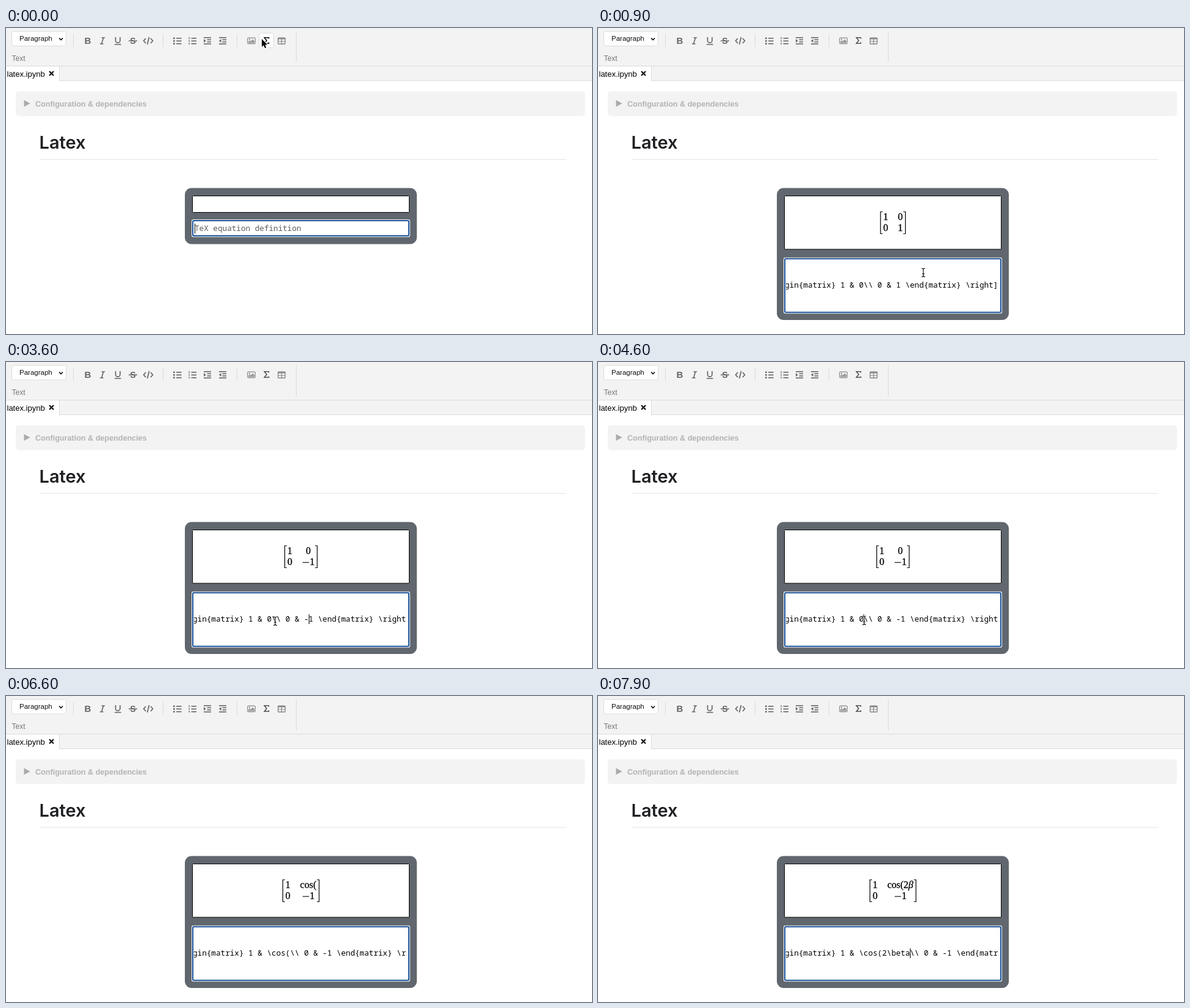
These frames come from a looping animation (960 px wide and 502 px high, 8000 ms). An HTML page with a canvas:

```html
<!DOCTYPE html>
<html lang="en">
<head>
<meta charset="utf-8">
<title>Equation editor</title>
<style>
html, body { margin: 0; width: 100%; height: 100%; overflow: hidden; background: #fff; }
canvas { display: block; width: 960px; height: 502px; }
</style>
</head>
<body>
<canvas id="stage" width="960" height="502"></canvas>
<script>
const ctx = document.getElementById('stage').getContext('2d');
const LOOP = 8000, PASTE = 400;
const SANS = '"Liberation Sans", Arial, sans-serif';
const SERIF = '"Liberation Serif", Times, serif';
const CODE = '12.67px "Noto Sans Mono", monospace';
const CHAR = 7.6, CODE_X = 306;

// Editing steps: time, upper right cell, lower right cell, caret index
const edits = [
  [PASTE, '0', '1', 46], [1900, '0', '1', 24], [2600, '0', '-1', 25],
  [4200, '0', '-1', 17], [4700, '', '-1', 16], [4900, '\\', '-1', 17],
  [5300, '\\c', '-1', 18], [5500, '\\co', '-1', 19], [5800, '\\cos', '-1', 20],
  [6100, '\\cos(', '-1', 21], [7000, '\\cos(2', '-1', 22],
  [7300, '\\cos(2\\', '-1', 23], [7400, '\\cos(2\\b', '-1', 24],
  [7600, '\\cos(2\\be', '-1', 25], [7700, '\\cos(2\\bet', '-1', 26],
  [7900, '\\cos(2\\beta', '-1', 27]
];

// Pointer path: time, x, y
const path = [
  [0, 419, 18], [100, 423, 24], [400, 500, 300], [800, 533, 401], [1100, 533, 402],
  [1800, 490, 422], [2900, 490, 422], [3500, 441, 425], [3800, 441, 425],
  [4100, 436, 424], [4700, 436, 424]
];
const clicks = [1900, 4100];

const within = (t, a, b) => t >= a && t < b;

function text(str, x, y, font, color) {
  ctx.font = font;
  ctx.fillStyle = color;
  ctx.fillText(str, x, y);
}

function box(x, y, w, h, r, fill, stroke, width = 1) {
  ctx.beginPath();
  ctx.roundRect(x, y, w, h, r);
  if (fill) { ctx.fillStyle = fill; ctx.fill(); }
  if (stroke) { ctx.strokeStyle = stroke; ctx.lineWidth = width; ctx.stroke(); }
}

function rect(x, y, w, h, color) {
  ctx.fillStyle = color;
  ctx.fillRect(x, y, w, h);
}

function stroke(d, color, width) {
  ctx.strokeStyle = color;
  ctx.lineWidth = width;
  ctx.stroke(new Path2D(d));
}

function polygon(d, fill, edge, width) {
  const shape = new Path2D(d);
  if (edge) {
    ctx.strokeStyle = edge;
    ctx.lineWidth = width;
    ctx.stroke(shape);
  }
  ctx.fillStyle = fill;
  ctx.fill(shape);
}

function listIcon(x, numbered) {
  for (let i = 0; i < 3; i++) {
    const y = 16 + i * 4.5;
    rect(x + 5, y, 8.5, 1.6, '#666');
    if (numbered) rect(x + 1, y - 1, 1.2, 3.2, '#666');
    else rect(x, y - 0.5, 2.6, 2.6, '#666');
  }
}

function indentIcon(x, outward) {
  rect(x, 15, 12, 1.6, '#666');
  rect(x, 25.4, 12, 1.6, '#666');
  rect(x + 5.5, 18.5, 6.5, 1.6, '#666');
  rect(x + 5.5, 22, 6.5, 1.6, '#666');
  polygon(outward ? `M${x + 3.5} 18V24L${x} 21Z` : `M${x} 18V24L${x + 3.5} 21Z`, '#666');
}

function toolbar(active) {
  rect(0, 0, 960, 86, '#f3f3f3');
  rect(0, 62, 960, 1, '#dcdcdc');
  box(9.5, 5.5, 89, 24, 3, '#fff', '#dcdcdc');
  text('Paragraph', 22, 21, '11.5px ' + SANS, '#111');
  stroke('M87 16.5L90 19.5L93 16.5', '#111', 1.7);
  for (const x of [110, 257, 378]) rect(x, 10, 1, 21, '#dadada');
  rect(475, 5, 1, 51, '#dadada');
  text('Text', 9.5, 54, '12px ' + SANS, '#777');

  text('B', 128.6, 26, 'bold 15px ' + SANS, '#666');
  stroke('M156.5 16H162M154 26H159.5M159.6 16L156.6 26', '#666', 1.6);
  stroke('M179.5 15V20.5A3.7 3.7 0 0 0 186.9 20.5V15M178 27H188.5', '#666', 1.7);
  text('S', 203.3, 26, 'bold 14px ' + SANS, '#666');
  rect(201, 20.4, 14, 1.5, '#666');
  stroke('M229 17L225.5 21L229 25M237 17L240.5 21L237 25M234.5 15L231.5 27', '#666', 1.7);
  listIcon(274, false);
  listIcon(298.5, true);
  indentIcon(324, false);
  indentIcon(349, true);

  box(395.7, 16.2, 12.6, 9.6, 1.5, null, '#999', 1.4);
  polygon('M397 24.5V22.5L399.5 20.5L401 22L404 18.5L407 21.5V24.5Z', '#999');
  ctx.beginPath();
  ctx.arc(399, 19, 1.2, 0, 7);
  ctx.fill();
  if (active) box(414.5, 8.5, 24, 24, 3, '#fff', '#ddd');
  stroke('M430.5 17.5V15.8H423.3L427 20.5L423.3 25.2H430.5V23.5', active ? '#111' : '#555', 1.6);
  box(445.7, 16.2, 11.6, 10, 1, null, '#888', 1.4);
  rect(445, 16, 13, 2.5, '#888');
  stroke('M451.5 17V26M446 22H457', '#888', 1.2);
}

function page() {
  rect(0, 86, 960, 1, '#dcdcdc');
  rect(0, 63, 87, 24, '#fff');
  rect(87, 63, 1, 23, '#dcdcdc');
  text('latex.ipynb', 1.5, 80, '13px ' + SANS, '#000');
  stroke('M71 71L78 78M78 71L71 78', '#111', 2.2);
  box(16, 104, 932.5, 40.5, 5, '#f3f3f3');
  polygon('M29.5 118.2V129.2L39.5 123.7Z', '#aaa');
  text('Configuration & dependencies', 48, 128.5, 'bold 12.6px ' + SANS, '#b3b3b3');
  text('Latex', 54.5, 198, '600 29px Inter, sans-serif', '#1f2023');
  rect(55, 215, 863, 1, '#e6e6e6');
}

// Splits a cell into typeset runs; unfinished commands stay red
function runs(cell) {
  const known = { '\\cos': 'cos', '\\beta': 'β', '\\': '', '-': '−' };
  return (cell.match(/\\[a-z]*|./g) || []).map(token => {
    const str = token in known ? known[token] : token;
    const font = (str === 'β' ? 'italic ' : '') + '16px ' + SERIF;
    ctx.font = font;
    const width = str === '−' ? 12.4 : ctx.measureText(str).width;
    return { str, font, width, color: str[0] === '\\' ? '#b5121b' : '#000' };
  });
}

const widthOf = list => list.reduce((sum, run) => sum + run.width, 0);

function drawRuns(list, center, y) {
  let x = center - widthOf(list) / 2;
  for (const run of list) {
    if (run.str === '−') rect(x + 1, y - 4.7, 10.4, 1.1, '#000');
    else {
      text(run.str, x, y, run.font, run.color);
      ctx.strokeStyle = run.color;
      ctx.lineWidth = 0.3;
      ctx.strokeText(run.str, x, y);
    }
    x += run.width;
  }
}

function matrix(top, bottom) {
  const a = runs(top), b = runs(bottom);
  const w = Math.max(widthOf(a), widthOf(b));
  const left = 483.2 - (34 + w) / 2, right = left + 34 + w;
  stroke(`M${left + 4} 301.5H${left + 0.6}V337.5H${left + 4}` +
         `M${right - 4} 301.5H${right - 0.6}V337.5H${right - 4}`, '#000', 1.2);
  drawRuns(runs('1'), left + 9, 315);
  drawRuns(runs('0'), left + 9, 333);
  drawRuns(a, left + 29 + w / 2, 315);
  drawRuns(b, left + 29 + w / 2, 333);
}

function dialog(t) {
  const edit = edits.filter(e => e[0] <= t).pop();
  const extra = edit ? 61.5 : 0;
  const fieldY = 315 + extra + (edit ? 1 : 0), fieldH = edit ? 90 : 27;
  box(293, 262.5, 380, edit ? 216.5 : 92, 11, '#61676e');
  box(305.5, 275.5, 355, 27 + extra - (edit ? 1 : 0), 1, '#fff', '#000');
  box(304, fieldY - 1, 358, fieldH + 2, 3, '#fff');
  box(306, fieldY + 1, 354, fieldH - 2, 2, '#fff', '#174f95', 2);

  const caretOn = (t - (edit ? edit[0] : 0)) % 1000 < 500;
  if (!edit) {
    text('TeX equation definition', 309, 333, CODE, '#5c5c5c');
    if (caretOn) rect(309, 321, 1, 16, '#000');
    return;
  }
  const [, top, bottom, caret] = edit;
  matrix(top, bottom);
  ctx.save();
  ctx.beginPath();
  ctx.rect(308, 380, 348.5, 84);
  ctx.clip();
  const line = `gin{matrix} 1 & ${top}\\\\ 0 & ${bottom} \\end{matrix} \\right]`;
  text(line, CODE_X, 426, CODE, '#000');
  if (caretOn) rect(Math.round(CODE_X + caret * CHAR), 414, 1, 16, '#000');
  ctx.restore();
}

function pointerAt(t) {
  const i = path.findIndex(p => p[0] > t);
  const [t0, x0, y0] = path[i - 1], [t1, x1, y1] = path[i];
  const u = (t - t0) / (t1 - t0), k = u * u * (3 - 2 * u);
  return [x0 + (x1 - x0) * k, y0 + (y1 - y0) * k];
}

function pointer(t) {
  if (t >= 4700 || within(t, 2600, 2900)) return;
  const [x, y] = pointerAt(t);
  ctx.save();
  ctx.translate(x, y);
  if (t < 300) {
    polygon('M0 0V13L3 10.3L5.2 15L7.3 14L5.3 9.5H9.3Z', '#000', '#fff', 2);
  } else {
    const beam = 'M-3 -7Q0 -7 0 -5Q0 -7 3 -7M0 -5V5M-3 7Q0 7 0 5Q0 7 3 7M-2 2H2';
    stroke(beam, '#fff', 2.6);
    stroke(beam, '#111', 1.2);
  }
  if (clicks.some(c => within(t, c, c + 200))) {
    ctx.beginPath();
    ctx.arc(-0.7, 0, 14, 0, Math.PI * 2);
    ctx.strokeStyle = '#000';
    ctx.lineWidth = 3;
    ctx.stroke();
  }
  ctx.restore();
}

function draw(now) {
  const t = Math.floor((now % LOOP) / 100) * 100;
  rect(0, 0, 960, 502, '#fff');
  toolbar(t < 200);
  page();
  dialog(t);
  pointer(t);
  requestAnimationFrame(draw);
}
requestAnimationFrame(draw);
</script>
</body>
</html>
```
